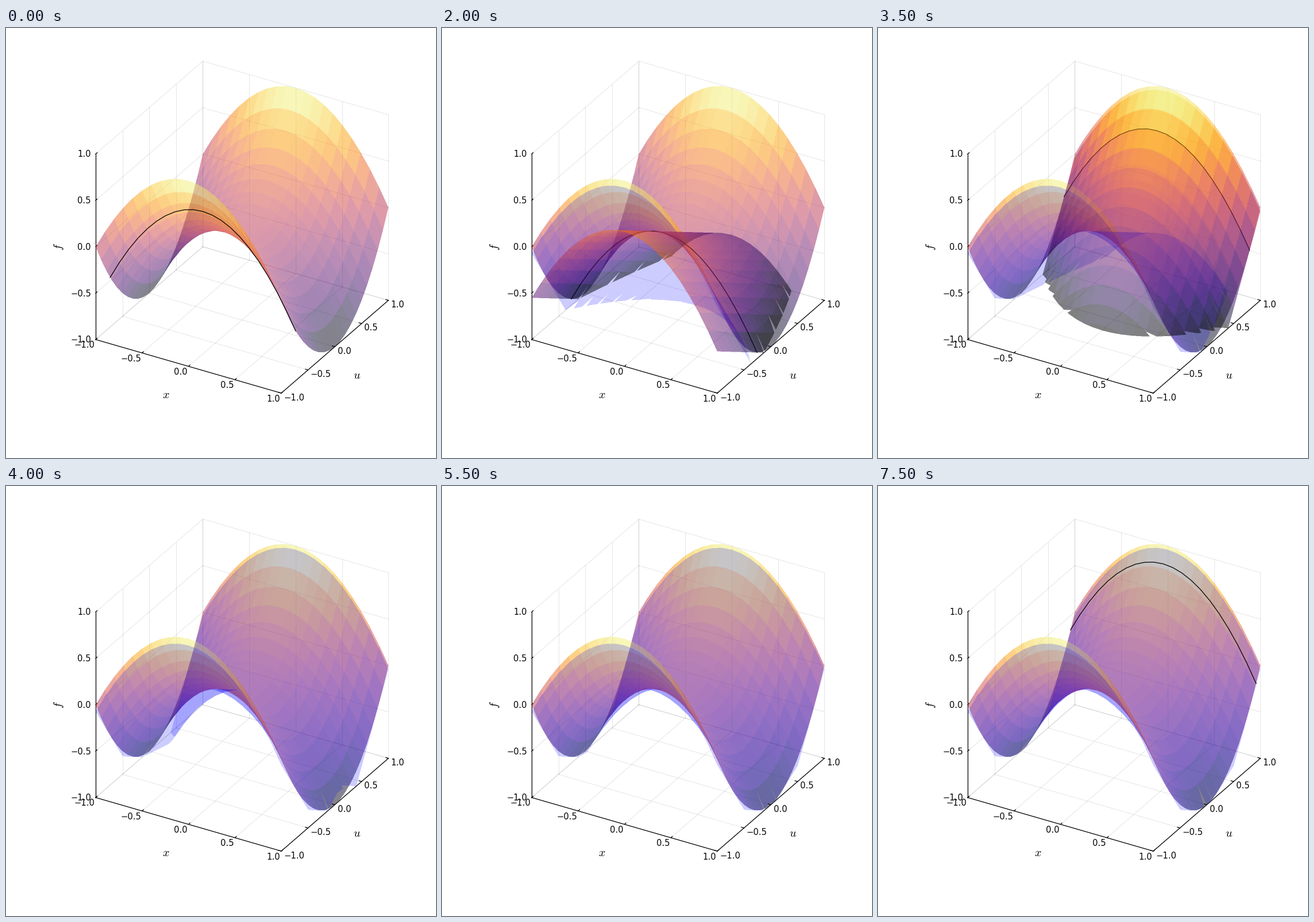
Animation of 748 by 748 pixels, one loop 8 s. Source, as a matplotlib script:

```python
import numpy as np
import matplotlib.pyplot as plt
from matplotlib.animation import FuncAnimation
from matplotlib.path import Path

SIZE, DPI, SS = 748, 100, 2
PX = 72 / DPI
SCALE, CX, CY = 186.4, 410.6, 346.4
COS, SIN = np.sqrt(3) / 2, 0.5
FLOOR = -1
POINTS = [-0.731, -0.258, 0.80, 0.216, -0.095, 0.92]
TICKS = [-1, -0.5, 0, 0.5, 1]

plt.rcParams["font.family"] = "DejaVu Sans"
plt.rcParams["mathtext.fontset"] = "cm"

grid = np.linspace(-1, 1, 21)
X, U = np.meshgrid(grid, grid, indexing="ij")


def project(x, u, z):
    """Parallel projection, azimuth and elevation both 30 degrees."""
    px = CX + SCALE * (COS * x + SIN * u)
    py = CY + SCALE * (SIN * SIN * x - SIN * COS * u - COS * z)
    return px, py


def saddle(x, u):
    return u**2 - x**2


def tangent(u0):
    return 2 * u0 * U - u0**2 - X**2


def clip_cell(x, u, z):
    """Replace corners below the floor by a point on one of their edges."""
    good = z >= FLOOR - 1e-9
    pts = []
    for k in range(4):
        if good[k]:
            pts.append(project(x[k], u[k], z[k]))
            continue
        for n in (3 - k, k ^ 1):
            if good[n]:
                t = (z[n] - FLOOR) / (z[n] - z[k])
                pts.append(project(x[n] + t * (x[k] - x[n]),
                                   u[n] + t * (u[k] - u[n]), FLOOR))
                break
    return np.array(pts)


def render(Z, alpha, color=None):
    """Blend the cells of a surface back to front into an RGBA layer."""
    n = SIZE * SS
    img = np.zeros((n, n, 4), np.float32)
    for j in reversed(range(20)):
        for i in range(20):
            idx = ([i, i + 1, i + 1, i], [j, j, j + 1, j + 1])
            z = Z[idx]
            pts = clip_cell(X[idx], U[idx], z)
            if len(pts) < 3:
                continue
            pts = pts * SS
            x0, y0 = np.floor(pts.min(0)).astype(int)
            x1, y1 = np.ceil(pts.max(0)).astype(int) + 1
            gx, gy = np.meshgrid(np.arange(x0, x1) + 0.5, np.arange(y0, y1) + 0.5)
            inside = Path(pts).contains_points(np.column_stack([gx.ravel(), gy.ravel()]))
            inside = inside.reshape(gx.shape)
            rgb = color or plt.cm.inferno(float(np.clip((z.mean() + 1) / 2, 0, 1)))[:3]
            ink = np.array([*rgb, 1], np.float32) * alpha
            part = img[y0:y1, x0:x1]
            part[inside] = part[inside] * (1 - alpha) + ink
    img = img.reshape(SIZE, SS, SIZE, SS, 4).mean((1, 3))
    img[..., :3] /= np.maximum(img[..., 3:], 1e-6)
    return np.clip(img, 0, 1)


fig = plt.figure(figsize=(SIZE / DPI, SIZE / DPI), dpi=DPI, facecolor="white")
ax = fig.add_axes([0, 0, 1, 1])


def segment(a, b, width, **kw):
    (x0, y0), (x1, y1) = project(*a), project(*b)
    ax.plot([x0, x1], [y0, y1], color="black", lw=width * PX, **kw)


def label(x, y, text, ha):
    ax.text(x, y + 5.4, text, fontsize=14.7 * PX, ha=ha, va="baseline", zorder=7)


def layer(zorder):
    return ax.imshow(np.zeros((SIZE, SIZE, 4)), extent=(0, SIZE, SIZE, 0),
                     interpolation="nearest", aspect="auto", zorder=zorder)


# grid on the floor and the two back walls
for t in TICKS:
    for a, b in [((t, -1, -1), (t, 1, -1)), ((t, 1, -1), (t, 1, 1)),
                 ((-1, t, -1), (1, t, -1)), ((-1, t, -1), (-1, t, 1)),
                 ((-1, -1, t), (-1, 1, t)), ((-1, 1, t), (1, 1, t))]:
        segment(a, b, 1, alpha=0.1, zorder=1)

# axes, ticks and labels
segment((-1, -1, -1), (1, -1, -1), 1.25, zorder=2)
segment((1, -1, -1), (1, 1, -1), 1.25, zorder=2)
segment((-1, -1, -1), (-1, -1, 1), 1.25, zorder=2)
LEN = 0.028
for t in TICKS:
    text = f"{t:.1f}".replace("-", "\u2212")
    segment((t, -1, -1), (t, -1 + LEN, -1), 1.25, zorder=2)
    segment((1, t, -1), (1 - LEN, t, -1), 1.25, zorder=2)
    segment((-1, -1, t), (-1, -1 + LEN, t), 1.25, zorder=2)
    x, y = project(t, -1, -1)
    label(x - 1.5, y + 9, text, "right")
    x, y = project(1, t, -1)
    label(x + 4.5, y + 7, text, "left")
    x, y = project(-1, -1, t)
    label(x - 8, y, text, "right")

ax.text(278, 644.3, "$x$", fontsize=20 * PX, ha="center", va="baseline")
ax.text(610, 610.3, "$u$", fontsize=20 * PX, ha="center", va="baseline")
ax.text(92, 380, "$f$", fontsize=20 * PX, ha="center", va="center", rotation=90)

# surfaces
layer(3).set_data(render(saddle(X, U), 0.5))
bound_im, plane_im = layer(4), layer(6)
curve, = ax.plot([], [], color="black", lw=1.25 * PX, zorder=5)
ax.set_xlim(0, SIZE)
ax.set_ylim(SIZE, 0)
ax.axis("off")

planes = [tangent(u0) for u0 in POINTS[:-1]]
plane_layers = [render(p, 0.5) for p in planes]
bound_layers = [render(b, 0.2, (0, 0, 1)) for b in np.maximum.accumulate(planes)]


def update(n):
    # each step: the curve, then its tangent surface, then the new lower bound
    step, phase = divmod(n, 3)
    u0 = POINTS[step]
    curve.set_data(*project(grid, u0, saddle(grid, u0)))
    curve.set_visible(phase < 2)

    plane_im.set_visible(phase == 1)
    if phase == 1:
        plane_im.set_data(plane_layers[step])

    count = step + (phase == 2)
    bound_im.set_visible(count > 0)
    if count:
        bound_im.set_data(bound_layers[count - 1])
    return bound_im, curve, plane_im


anim = FuncAnimation(fig, update, frames=16, interval=500, repeat=True,
                     repeat_delay=0, blit=False)
plt.show()
```
